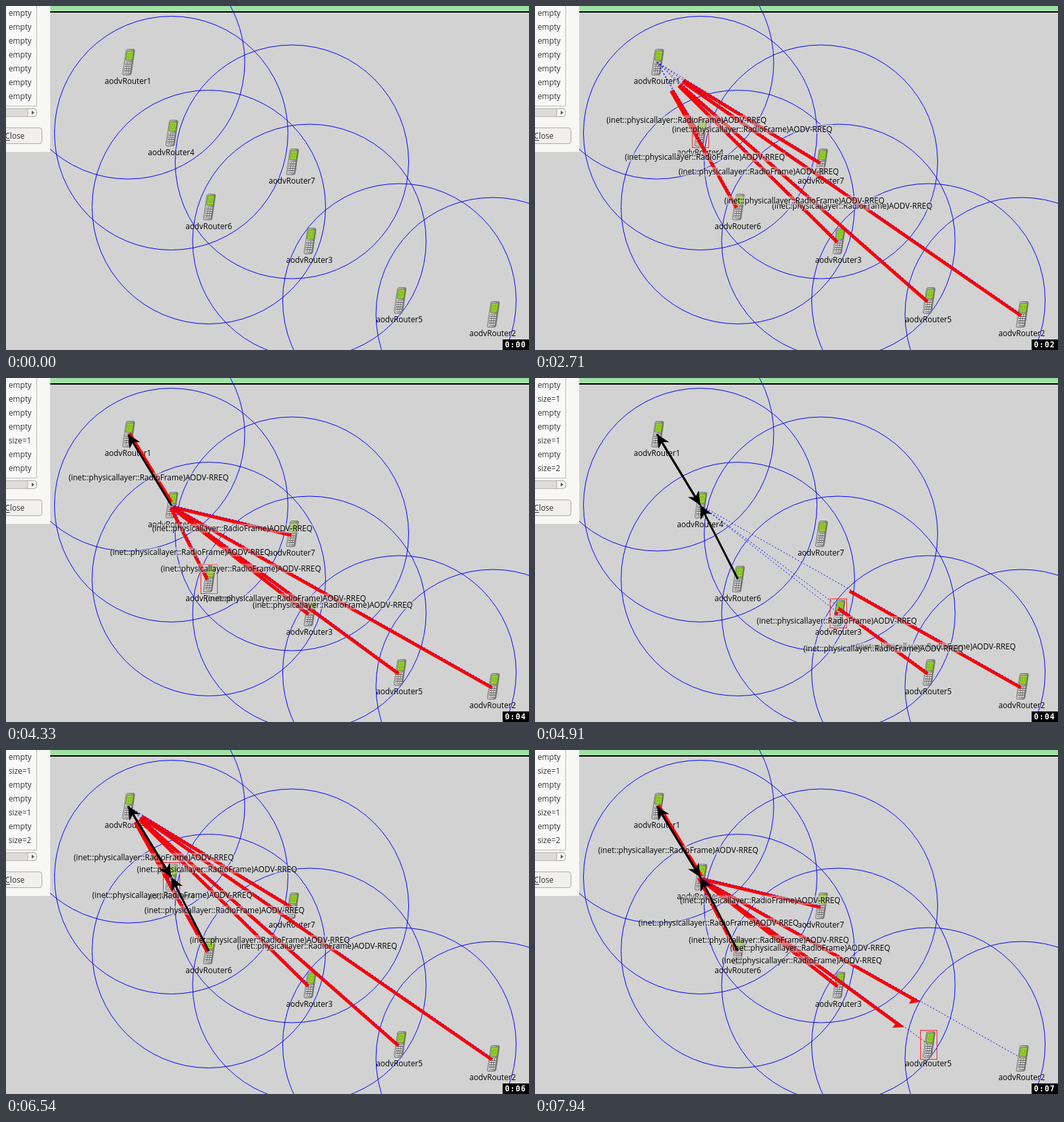
Recreate the animation shown at these times as an HTML page with a canvas. Size 793x521 px, loop 8 s.

```html
<!DOCTYPE html>
<html lang="en">
<head>
<meta charset="utf-8">
<title>AODV route discovery</title>
<style>
  html, body { margin: 0; width: 100%; height: 100%; overflow: hidden; background: #d2d2d2; }
  canvas { display: block; }
</style>
</head>
<body>
<canvas id="stage" width="793" height="521"></canvas>
<script>
const ctx = document.getElementById('stage').getContext('2d');
const LOOP = 8000, FIRST_EVENT = 960, STEP = 116.3;
const RANGE = 177;
const FONT = '11.75px "Open Sans", "Noto Sans", sans-serif';
const MESSAGE = '(inet::physicallayer::RadioFrame)AODV-RREQ';

// Listed in the stacking order of their message labels.
const nodes = [
  { id: 7, x: 433.5, y: 236 },
  { id: 3, x: 460, y: 356 },
  { id: 2, x: 738, y: 467 },
  { id: 5, x: 596.5, y: 446 },
  { id: 6, x: 307.5, y: 304.5 },
  { id: 4, x: 250.5, y: 192.5 },
  { id: 1, x: 185, y: 85 }
];
const node = id => nodes.find(n => n.id === id);
const distance = (a, b) => Math.hypot(b.x - a.x, b.y - a.y);

// Each broadcast has a leading edge and, later, a trailing edge.
const waves = [
  { source: 1, head: [1046, 2090], tail: [2330, 3230] },
  { source: 4, head: [3240, 3883], tail: [4150, 5135] },
  { source: 1, head: [5150, 6064], tail: [6230, 7150] },
  { source: 4, head: [7250, 8030], tail: [9000, 10000] }
].map(wave => {
  const source = node(wave.source);
  const targets = nodes.filter(n => n !== source)
    .map(n => ({ node: n, dist: distance(source, n) }));
  return { ...wave, source, targets, limit: Math.max(...targets.map(g => g.dist)) };
});

const routes = [
  { from: 4, to: 1, at: 2847 },
  { from: 1, to: 4, at: 4755 },
  { from: 6, to: 4, at: 4750 }
];
const tableRows = [
  {}, { at: 4755, text: 'size=1' }, {}, {},
  { at: 2847, text: 'size=1' }, {}, { at: 4750, text: 'size=2' }
];

function reach(wave, [start, end], t) {
  const p = Math.min(1, Math.max(0, (t - start) / (end - start)));
  return wave.limit * p ** 3;
}

function line(a, b, color, width, dash = []) {
  ctx.strokeStyle = color;
  ctx.lineWidth = width;
  ctx.setLineDash(dash);
  ctx.beginPath();
  ctx.moveTo(a.x, a.y);
  ctx.lineTo(b.x, b.y);
  ctx.stroke();
  ctx.setLineDash([]);
}

// Fills a shape given as [along, across] offsets from the tip.
function arrowhead(tip, ux, uy, color, points) {
  ctx.fillStyle = color;
  ctx.beginPath();
  for (const [along, across] of points)
    ctx.lineTo(tip.x + ux * along - uy * across, tip.y + uy * along + ux * across);
  ctx.fill();
}

function text(str, x, y, color = '#000', align = 'center') {
  ctx.font = FONT;
  ctx.textAlign = align;
  ctx.fillStyle = color;
  ctx.fillText(str, x, y);
}

function box(x, y, w, h, r, fill, stroke) {
  ctx.beginPath();
  ctx.roundRect(x, y, w, h, r);
  ctx.fillStyle = fill;
  ctx.fill();
  if (stroke) {
    ctx.strokeStyle = stroke;
    ctx.lineWidth = 1;
    ctx.stroke();
  }
}

function phone({ x, y }) {
  ctx.save();
  ctx.transform(1, 0, -0.15, 1, x + 1, y);
  const metal = ctx.createLinearGradient(-7, 0, 7, 0);
  metal.addColorStop(0, '#dcdcdc');
  metal.addColorStop(0.7, '#a0a0a0');
  metal.addColorStop(1, '#606060');
  box(-6.5, -19.5, 13, 39, 3, metal, '#747474');
  box(-5, -17, 10, 14, 1, '#96cf2c', '#64892c');
  ctx.strokeStyle = '#78b324';
  ctx.strokeRect(-2, -13, 4, 6);
  box(-5, -0.5, 10, 17, 1, '#6c6c6c');
  ctx.fillStyle = '#e4e4e4';
  for (let row = 0; row < 5; row++)
    for (let col = 0; col < 3; col++)
      ctx.fillRect(-4.6 + col * 3.3, 0.3 + row * 3.4, 2.5, 2);
  ctx.restore();
}

function drawNetwork() {
  ctx.fillStyle = '#d2d2d2';
  ctx.fillRect(0, 0, 793, 521);
  ctx.fillStyle = '#a1e0a4';
  ctx.fillRect(67, 0, 726, 8);
  ctx.fillStyle = '#000';
  ctx.fillRect(67, 8, 726, 2);
  ctx.strokeStyle = '#00f';
  ctx.lineWidth = 1;
  for (const n of nodes) {
    ctx.beginPath();
    ctx.arc(n.x, n.y, RANGE, 0, 2 * Math.PI);
    ctx.stroke();
  }
  for (const n of nodes) {
    phone(n);
    text('aodvRouter' + n.id, n.x, n.y + 33);
  }
}

function drawWave(wave, t) {
  const front = reach(wave, wave.head, t);
  const back = reach(wave, wave.tail, t);
  const { source, targets, limit } = wave;
  const edge = front < limit ? front : back;
  const upcoming = targets.filter(g => g.dist > edge).sort((a, b) => a.dist - b.dist)[0];
  const active = edge > 0 && upcoming ? upcoming.node : source;
  ctx.strokeStyle = '#f22';
  ctx.lineWidth = 1;
  ctx.strokeRect(Math.floor(active.x - 12.5) + 0.5, Math.floor(active.y - 22) + 0.5, 25, 44);
  if (!front) return;

  const signals = targets.filter(g => g.dist > back).map(g => {
    const ux = (g.node.x - source.x) / g.dist, uy = (g.node.y - source.y) / g.dist;
    const at = (along, across = 0) => ({
      x: source.x + ux * along - uy * across,
      y: source.y + uy * along + ux * across
    });
    return { ...g, ux, uy, at, end: Math.min(front, g.dist) };
  });
  // A signal runs along the right-hand side of its link.
  for (const { node, dist, ux, uy, at, end } of signals) {
    const flying = front < dist;
    line(at(back, 2.5), at(flying ? Math.max(0, end - 6) : end, 2.5), '#f00', 5);
    if (flying) arrowhead(at(end), ux, uy, '#f00', [[0, 0], [-14, 12], [-14, 0]]);
    line(source, node, '#00f', 1, [2, 3]);
  }
  ctx.font = FONT;
  const width = ctx.measureText(MESSAGE).width;
  for (const { at, end } of signals) {
    const { x, y } = at((back + end) / 2);
    ctx.fillStyle = 'rgba(211,211,211,.45)';
    ctx.fillRect(x - width / 2, y + 6, width, 14);
    text(MESSAGE, x - 0.5, y + 17.5);
  }
}

function drawRoute(route) {
  const a = node(route.from), b = node(route.to), d = distance(a, b);
  const ux = (b.x - a.x) / d, uy = (b.y - a.y) / d;
  line(a, { x: b.x - ux * 13, y: b.y - uy * 13 }, '#000', 3);
  arrowhead(b, ux, uy, '#000', [[0, 0], [-20, 9.5], [-14, 0], [-20, -9.5]]);
}

function drawDialog(t) {
  ctx.fillStyle = '#f7f7f6';
  ctx.fillRect(0, 0, 67, 221);
  box(-10, -10, 56.5, 161.5, 0, '#f9f9f9', '#bcbab7');
  tableRows.forEach((row, i) =>
    text(t >= row.at ? row.text : 'empty', 4, 15 + i * 21, '#333', 'left'));
  box(-10, 155.5, 56.5, 12, 4, '#f4f3f2', '#aaa7a3');
  box(-10, 155.5, 43, 12, 3, '#dedcda', '#b5b2ae');
  arrowhead({ x: 43, y: 161.5 }, 1, 0, '#555', [[0, 0], [-4, 3], [-4, -3]]);
  box(-10, 184.5, 64.5, 24, 4, '#f1f0ef', '#aaa7a3');
  text('Close', -1.5, 201, '#333', 'left');
  ctx.fillStyle = '#333';
  ctx.fillRect(0, 203, 6, 1);
}

function drawClock(t) {
  const seconds = Math.max(0, Math.floor((t - 215) / 1010));
  ctx.fillStyle = '#000';
  ctx.fillRect(753, 505, 40, 16);
  ctx.font = 'bold 11.5px "DejaVu Sans Mono", monospace';
  ctx.letterSpacing = '1.2px';
  ctx.textAlign = 'left';
  ctx.fillStyle = '#fff';
  ctx.fillText('0:0' + seconds, 756.5, 517);
  ctx.letterSpacing = '0px';
}

function frame() {
  const now = performance.now() % LOOP;
  // The simulation view refreshes in discrete steps.
  const t = FIRST_EVENT + STEP * Math.floor((now - FIRST_EVENT + 8) / STEP);
  drawNetwork();
  if (t >= FIRST_EVENT) drawWave(waves.find(w => t < w.tail[1]), t);
  routes.filter(r => t >= r.at).forEach(drawRoute);
  drawDialog(t);
  drawClock(t);
  requestAnimationFrame(frame);
}
frame();
</script>
</body>
</html>
```
